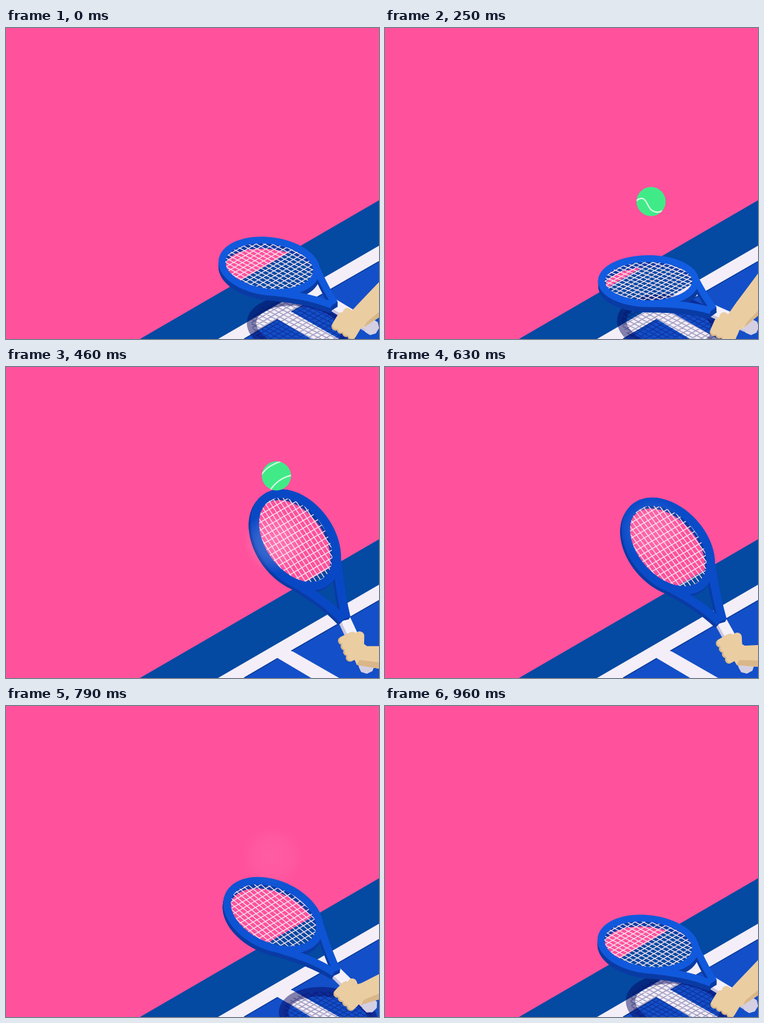
Write an HTML page with a canvas that moves like this. It is 600 by 500 pixels and loops after 2 s.

```html
<!DOCTYPE html>
<html lang="en">
<head>
<meta charset="utf-8">
<title>Tennis racket</title>
<style>
  html, body { margin: 0; width: 100%; height: 100%; overflow: hidden; background: #ff519c; }
  canvas { display: block; width: 600px; height: 500px; }
</style>
</head>
<body>
<canvas id="stage" width="600" height="500"></canvas>
<script>
const ctx = document.getElementById('stage').getContext('2d');
const LOOP = 2000, FPS = 24, REST = 23;

// Swing of the racket: [step, amount], eased between
const SWING = [[0, 0], [6.6, -0.17], [11.6, 1.02], [24, 0]];
const TILT = 41 * Math.PI / 180;

const ACROSS = [48, -28], FLAT = [59, 31.5], RISE = 70;
const SKIN = '#ebcda2', SKIN_SHADE = '#d9b789';

const mix = (a, b, t) => a + (b - a) * t;
const ease = t => (1 - Math.cos(Math.PI * t)) / 2;
const rgb = (a, b, t) => `rgb(${a.map((v, i) => Math.round(mix(v, b[i], t))).join()})`;
// p + a*u + b*v
const along = (p, u, a, v = u, b = 0) => [p[0] + a * u[0] + b * v[0], p[1] + a * u[1] + b * v[1]];

function swingAt(n) {
  const i = SWING.findIndex(k => n < k[0]);
  const [t0, a] = SWING[i - 1], [t1, b] = SWING[i];
  return mix(a, b, ease((n - t0) / (t1 - t0)));
}

// The racket turns about its grip; everything follows from the swing s
function poseAt(s) {
  const c = Math.cos(s * TILT), r = Math.sin(s * TILT);
  const u = [FLAT[0] * c, FLAT[1] * c + RISE * r];
  const pivot = [588 + 4 * s, 477];
  const tip = along(pivot, u, -1.04);
  const head = along(tip, u, -1.75, [0, -6], 1);
  const butt = [pivot[0] - 12 * s, pivot[1] + 4];
  return { s, u, tip, head, butt, depth: [-3 * s, 8 - 4.5 * s] };
}

function poly(fill, ...pts) {
  ctx.beginPath();
  pts.forEach(p => ctx.lineTo(...p));
  ctx.fillStyle = fill;
  ctx.fill();
}

function line(color, width, p, q, cap = 'butt') {
  ctx.beginPath();
  ctx.moveTo(...p);
  ctx.lineTo(...q);
  ctx.strokeStyle = color;
  ctx.lineWidth = width;
  ctx.lineCap = cap;
  ctx.stroke();
  ctx.lineCap = 'butt';
}

function stroke(path, color, width) {
  ctx.strokeStyle = color;
  ctx.lineWidth = width;
  ctx.stroke(path);
}

function court() {
  const corner = [600, 500], blue = '#134fc8', edge = '#0a3a98';
  ctx.fillStyle = '#ff519c';
  ctx.fillRect(0, 0, 600, 500);
  poly('#0449a2', [215.5, 500], [600, 277], corner);
  poly('#f3eef7', [341, 500], [600, 350], corner);
  poly(blue, [383, 500], [437, 468], [491, 500]);
  poly(blue, [459, 456], [600, 375], corner, [536, 500]);
  line(edge, 1.5, [383, 500], [437, 468.5]);
  line(edge, 1.5, [459, 456.5], [600, 375.5]);
}

// Racket coordinates: the head is the unit circle, the handle runs along +a
const mapper = (c, u, v) => (a, b) => along(c, u, a, v, b);

function framePath(at, tip) {
  const path = new Path2D();
  for (let i = 0; i < 72; i++) {
    const k = i * Math.PI / 36;
    path.lineTo(...at(Math.cos(k), Math.sin(k)));
  }
  path.closePath();
  for (const side of [-1, 1]) {
    path.moveTo(...at(0.7, side * 0.71));
    path.bezierCurveTo(...at(1, side * 0.5), ...at(1.3, side * 0.26), ...along(tip, ACROSS, side * 0.05));
  }
  return path;
}

function stringPath(at) {
  const path = new Path2D();
  for (let i = -7; i <= 7; i++) {
    const k = i * 0.13, e = Math.sqrt(1 - k * k);
    path.moveTo(...at(-e, k));
    path.lineTo(...at(e, k));
    path.moveTo(...at(k, -e));
    path.lineTo(...at(k, e));
  }
  return path;
}

function shadow({ s }) {
  const f = 1 - 0.16 * Math.max(0, s);
  const center = [471 + 100 * s + 90 * s * s, 481 + 30 * s + 57 * s * s];
  const at = mapper(center, FLAT.map(x => x * f), ACROSS.map(x => x * f));
  stroke(framePath(at, at(1.75, 0)), 'rgba(8,8,92,0.48)', 15);
  stroke(stringPath(at), 'rgba(8,8,92,0.34)', 1.6);
}

function racket({ s, u, tip, head, depth }) {
  const at = mapper(head, u, ACROSS);
  const frame = framePath(at, tip), width = mix(11, 14, Math.max(0, s));
  const layer = (k, path, color, w) => {
    ctx.save();
    ctx.translate(depth[0] * k, depth[1] * k);
    stroke(path, color, w);
    ctx.restore();
  };
  for (let k = 8; k > 0; k--) layer(k / 8, frame, '#0a3ba4', width);
  layer(0.4, stringPath(at), '#f6e2ee', 1.4);
  layer(0, frame, rgb([17, 89, 220], [9, 72, 196], s), width);
}

// Unit vectors along and across the grip
function gripAxes({ tip, butt }) {
  const x = butt[0] - tip[0], y = butt[1] - tip[1], len = Math.hypot(x, y);
  return [[x / len, y / len], [-y / len, x / len]];
}

function grip(p) {
  const [e, n] = gripAxes(p);
  line('#cbc5dc', 19, along(p.tip, n, 2), along(p.butt, n, 2));
  line('#f3f0fa', 16, along(p.tip, n, -1), along(p.butt, n, -1));
  const cap = Array.from({ length: 8 }, (_, i) => {
    const a = (i + 0.5) * Math.PI / 4;
    return along(p.butt, e, 12 * Math.cos(a), n, 13 * Math.sin(a));
  });
  poly('#d4cfe2', ...cap);
}

function hand(p) {
  const { s } = p, [e, n] = gripAxes(p);
  const fist = [548 + 8 * s, 479 - 40 * s + 10 * s * s];
  const top = [614, 394 + 100 * s - 45 * s * s], bottom = [614, 456 + 32 * s];
  const wristTop = [567 + 14 * s, 443 + 6 * s], wristBottom = [576 - 12 * s, 481 - 2 * s];
  const finger = (i, color, shift, width) => {
    const base = along(fist, e, (i - 1.5) * 10, n, shift);
    line(color, width, along(base, n, -8), along(base, n, 9), 'round');
  };
  for (let i = 0; i < 4; i++) finger(i, SKIN_SHADE, 1, 13);
  poly(SKIN, along(fist, e, -8, n, -13), wristTop, top, bottom, wristBottom, along(fist, e, 10, n, 4));
  poly(SKIN_SHADE, wristBottom, bottom, [614, bottom[1] - 11], [wristBottom[0] + 4, wristBottom[1] - 8]);
  for (let i = 0; i < 4; i++) finger(i, SKIN, -1.5, 12.5);
  const thumb = along(fist, e, -10, n, -19);
  line(SKIN, 15, thumb, along(fist, e, 4, n, -12), 'round');
}

function ball(n) {
  if (n < 1 || n > 13) return;
  const hit = n > 8, r = 23.5;
  const x = hit ? 430 + (n - 9) * 2.5 : 428 + (n - 6) * 0.4;
  const y = hit ? 312 - (n - 9) * 68.5 : 279 + (n - 6) * 52;
  ctx.save();
  ctx.translate(x, y);
  ctx.beginPath();
  ctx.arc(0, 0, r, 0, 7);
  ctx.fillStyle = '#40eb87';
  ctx.fill();
  ctx.clip();
  ctx.strokeStyle = '#d9fbe5';
  ctx.lineWidth = 2.2;
  ctx.beginPath();
  if (hit) {
    ctx.rotate((n - 10) * -0.04);
    ctx.moveTo(-24, -3);
    ctx.quadraticCurveTo(-13, -18, 9, -23);
    ctx.moveTo(-12, 24);
    ctx.quadraticCurveTo(2, 4, 25, 0);
  } else {
    ctx.rotate((n - 6) * 0.1);
    ctx.moveTo(-24, -1);
    ctx.bezierCurveTo(-8, -14, -7, 8, 0, 13);
    ctx.quadraticCurveTo(8, 20, 18, 15);
  }
  ctx.stroke();
  ctx.restore();
}

// Faint haze left after the hit
function puff(n) {
  if (n < 11) return;
  const t = (n - 11) / 12, alpha = 0.22 * (1 - t);
  ctx.save();
  ctx.translate(432 - 5 * t, 281 - 58 * t);
  const glow = ctx.createRadialGradient(0, 0, 0, 0, 0, 50);
  glow.addColorStop(0, `rgba(255,230,245,${alpha})`);
  glow.addColorStop(0.55, `rgba(255,230,245,${alpha * 0.75})`);
  glow.addColorStop(1, 'rgba(255,230,245,0)');
  ctx.fillStyle = glow;
  ctx.fillRect(-50, -50, 100, 100);
  ctx.restore();
}

function draw(ms) {
  const step = Math.floor(ms * FPS / 1000 + 0.06);
  const n = step < REST ? step : 0;
  const p = poseAt(swingAt(n));
  court();
  shadow(p);
  grip(p);
  racket(p);
  hand(p);
  ball(n);
  puff(n);
}

const start = performance.now();
function tick() {
  draw((performance.now() - start) % LOOP);
  requestAnimationFrame(tick);
}
tick();
</script>
</body>
</html>
```
